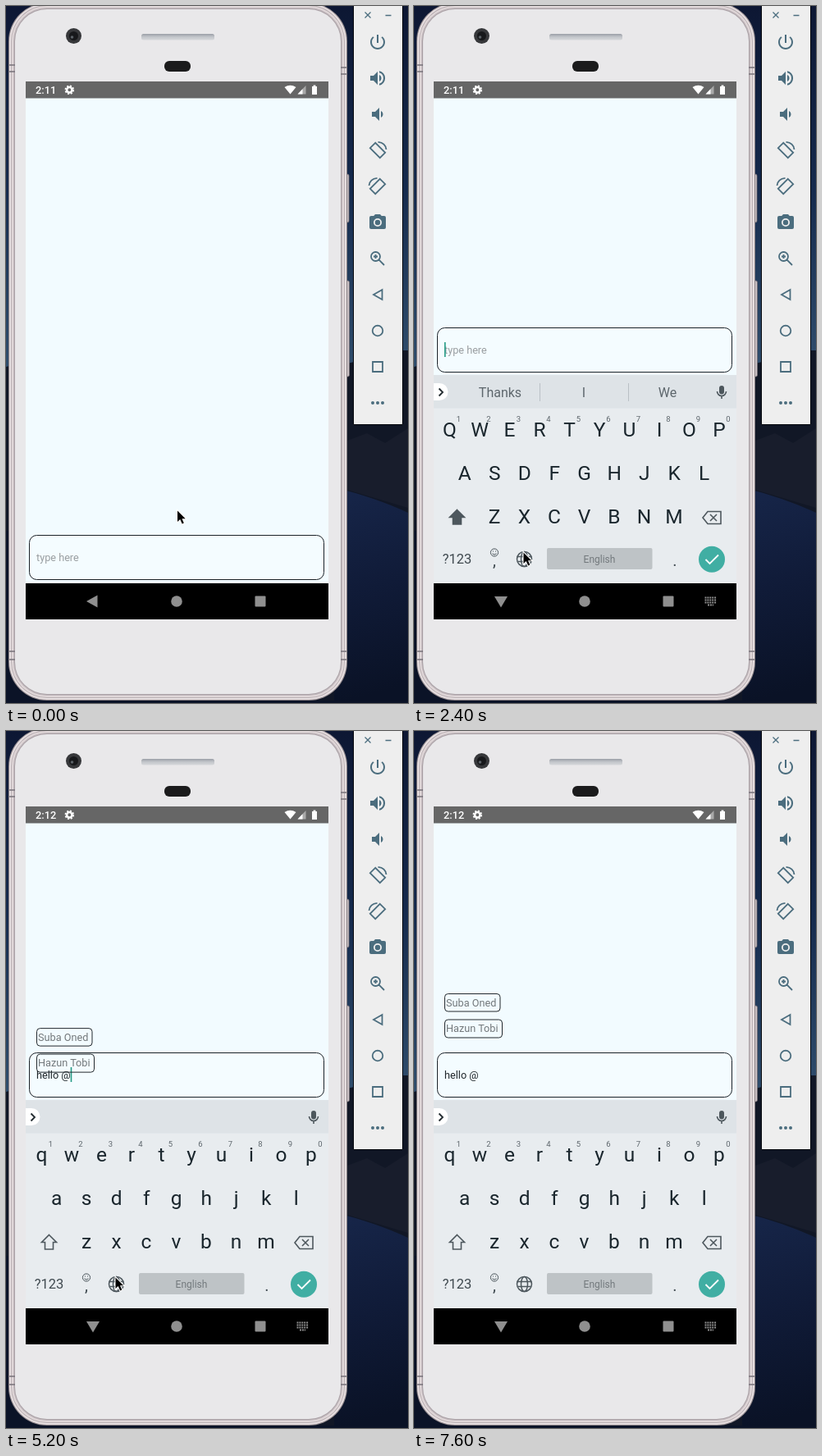
Animation, 490 px wide and 850 px high, one loop 7.7 s. Source, as an HTML page:

```html
<!DOCTYPE html>
<html lang="en">
<head>
<meta charset="utf-8">
<title>Mention input on a phone emulator</title>
<style>
  html, body { margin: 0; width: 100%; height: 100%; overflow: hidden; background: #0c1730; }
  svg { display: block; width: 490px; height: 850px; font-family: Roboto, sans-serif; }
  text { white-space: pre; }
  .mid { text-anchor: middle; }
  .line { fill: none; stroke: #4b6d7e; stroke-width: 1.8; }
</style>
</head>
<body>
<svg viewBox="0 0 490 850">
  <defs>
    <linearGradient id="sky" x2="0" y2="1">
      <stop offset="0" stop-color="#0d1733"/><stop offset=".5" stop-color="#152a4d"/><stop offset="1" stop-color="#304e6d"/>
    </linearGradient>
    <linearGradient id="dune" x2=".1" y2="1">
      <stop offset="0" stop-color="#17264a"/><stop offset=".5" stop-color="#101b38"/><stop offset="1" stop-color="#0a1226"/>
    </linearGradient>
    <linearGradient id="slot" x2="0" y2="1">
      <stop offset="0" stop-color="#9a9ea6"/><stop offset=".5" stop-color="#c3c6cb"/><stop offset="1" stop-color="#d5d7da"/>
    </linearGradient>
    <clipPath id="screen"><path d="M24 92H393V748H24Z"/></clipPath>
  </defs>

  <!-- desktop -->
  <path fill="url(#sky)" d="M0 0H490V445H0Z"/>
  <path fill="#111726" d="M0 440L12 437L416 436L482 420H490V850H0Z"/>
  <path fill="#181d2c" d="M416 530L440 521L462 533L490 515V612L416 590Z"/>
  <path fill="url(#dune)" d="M400 587Q452 600 490 618V850H400Z"/>
  <path fill="#0b1327" d="M0 640H60V850H0ZM0 847H490V850H0Z"/>

  <!-- phone -->
  <g fill="#c9bfc3" stroke="#746d73" stroke-width=".8">
    <rect x="412" y="205" width="6" height="59" rx="2"/>
    <rect x="412" y="335" width="6.5" height="117" rx="2"/>
  </g>
  <g id="body"></g>
  <path stroke="#77717a" stroke-width="1.4" d="M4 72h7M4 80h7M408 75h7M408 83h7M4 787h7M4 797h7M408 787h7M408 797h7"/>
  <circle cx="82.500" cy="36.500" r="9.500" fill="#37383b"/>
  <circle cx="82.500" cy="36.500" r="5.500" fill="#17181b"/>
  <circle cx="80.500" cy="38" r="1.800" fill="#5c6268"/>
  <rect x="165" y="34" width="89" height="7.500" rx="2.500" fill="url(#slot)"/>
  <rect x="193" y="67" width="32" height="13" rx="6" fill="#1b1b1c"/>

  <!-- app -->
  <path fill="#f2fbff" d="M24 92H393V748H24Z"/>
  <path fill="#666" d="M24 92H393V112.500H24Z"/>
  <text id="clock" x="36" y="107" font-size="12.800" font-weight="500" fill="#fff"></text>
  <g fill="none" stroke="#fff">
    <circle cx="77.300" cy="102.300" r="3.200" stroke-width="2.500"/>
    <circle cx="77.300" cy="102.300" r="4.900" stroke-width="1.800" stroke-dasharray="2.100 1.748"/>
  </g>
  <path fill="#fff" d="M339.500 99Q346.500 94.500 353.500 99L346.500 107.500ZM373 98h1.600v-1.600h2.800V98H379V108h-6Z"/>
  <path fill="#a9a9a9" d="M355.500 107.500L365.500 97V107.500Z"/>
  <path fill="#fff" d="M355.500 107.500L361.500 101.200V107.500Z"/>

  <g id="field">
    <rect x="28.500" y="645.500" width="359" height="54" rx="9" fill="#f4fcff" stroke="#1c2127"/>
    <text id="hint" x="37" y="677" font-size="12.700" fill="#999ea1">type here</text>
    <text id="entry" x="37" y="677" font-size="12.700" fill="#20262a"></text>
    <path id="underline" stroke="#20262a"/>
    <rect id="caret" y="663" width="1.600" height="18" fill="#249b85"/>
  </g>
  <g id="chips" font-size="12.700" fill="#73787b">
    <rect x="37.500" y="320.500" width="67.500" height="21.500" rx="4" fill="none" stroke="#23282d"/>
    <text x="39" y="335.500">Suba Oned</text>
    <rect x="37.500" y="352" width="70" height="22" rx="4" fill="none" stroke="#23282d"/>
    <text x="39" y="367">Hazun Tobi</text>
  </g>

  <!-- keyboard -->
  <path fill="#000" d="M24 704H393V748H24Z"/>
  <g clip-path="url(#screen)"><g id="keyboard">
    <path fill="#e8ecef" d="M24 450H393V704H24Z"/>
    <path fill="#dee3e7" d="M24 450H393V490.500H24Z"/>
    <path fill="#000" d="M24 704H393V1000H24Z"/>
    <path fill="#fff" d="M24 460H31a10.500 10.500 0 0 1 0 21H24Z"/>
    <path fill="none" stroke="#222b30" stroke-width="1.800" d="M30.500 466.500L35 471L30.500 475.500"/>
    <g id="words" class="mid" font-size="16" fill="#5d666c">
      <path stroke="#bac0c5" d="M153.500 460V482M261.500 460V482"/>
      <text x="105" y="477"></text><text x="207" y="477"></text><text x="309" y="477"></text>
    </g>
    <rect x="372" y="463" width="6" height="10.500" rx="3" fill="#4d575d"/>
    <path fill="none" stroke="#4d575d" stroke-width="1.600" d="M369.500 470a5.500 5.500 0 0 0 11 0M375 475.500V479"/>
    <g id="keys" class="mid" font-size="24.500" fill="#1a262d"></g>
    <path id="shift" stroke="#4d575d" stroke-width="1.600" d="M52.500 614.500L61.500 623.500H57.500V632H47.500V623.500H43.500Z"/>
    <path fill="none" stroke="#4d575d" stroke-width="1.600" d="M358 616.500H374V631.500H358L352 624ZM361 620L369 628M369 620L361 628"/>
    <g class="mid" fill="#3f494f">
      <text x="52.500" y="680" font-size="16.500">?123</text>
      <text x="98" y="683" font-size="20">,</text>
      <text x="318" y="683" font-size="20">.</text>
    </g>
    <g fill="none" stroke="#4d575d">
      <circle cx="98" cy="666.500" r="4.600"/>
      <path d="M95.500 667.800q2.500 2.600 5 0M96 665h1M99 665h1"/>
      <g stroke-width="1.500">
        <circle cx="134.500" cy="674.500" r="9"/><ellipse cx="134.500" cy="674.500" rx="4" ry="9"/>
        <path d="M126.500 671.500h16M126.500 677.500h16"/>
      </g>
    </g>
    <rect x="162" y="661" width="128.500" height="26" rx="2" fill="#bec3c6"/>
    <text class="mid" x="226" y="679" font-size="12" fill="#73797d">English</text>
    <circle cx="363" cy="674.700" r="16" fill="#40aea3"/>
    <path fill="none" stroke="#fff" stroke-width="1.800" d="M355.500 675L360.500 680L371 669.500"/>
  </g></g>

  <!-- navigation bar -->
  <g fill="#8f8f8f">
    <path id="back"/>
    <circle cx="208" cy="726" r="6.800"/>
    <rect x="303.500" y="719.500" width="13" height="13" rx="1"/>
    <path id="imeIcon" fill="none" stroke="#8f8f8f" stroke-width="2" stroke-dasharray="2 .9"
      d="M354.500 721.500h14M354.500 724.500h14M354.500 727.500h14M358 730.500h7"/>
  </g>

  <!-- emulator toolbar -->
  <path fill="#eee" stroke="#05070c" d="M423.500 -1H483.500V510.500H423.500Z"/>
  <path class="line" style="stroke-width:1.300" d="M437.500 7.500l7 7M444.500 7.500l-7 7M462.500 11.500h7"/>
  <g id="tools" fill="#4b6d7e"></g>

  <path id="mouse" stroke="#fff" stroke-width="2" paint-order="stroke"
    d="M0 .5V14L3.200 11L5.700 16.500L7.800 15.600L5.500 10.300H9.700Z"/>
</svg>

<script>
const LOOP = 7700, STEP = 100;
const FOCUS = 1400, MENTION = 5100, MINUTE = 4500, MOUSE_HIDDEN = 6200;
const $ = id => document.getElementById(id);

function add(parent, tag, attrs, text = '') {
  const el = document.createElementNS('http://www.w3.org/2000/svg', tag);
  for (const name in attrs) el.setAttribute(name, attrs[name]);
  el.textContent = text;
  return parent.appendChild(el);
}

// Metal rim as nested outlines
['#8f878b', '#e0d7d9', '#ebe4e5', '#b9afb3', '#e3dadb', '#ddd4d6', '#c3babe', '#aba2a7', '#e9e8ea']
  .forEach((fill, i) => add($('body'), 'rect',
    { x: 3 + i, y: i - 4, width: 413 - 2 * i, height: 851 - 2 * i, rx: 47 - i, fill }));

const letters = [];
[['qwertyuiop', 43.5, 525], ['asdfghjkl', 61.7, 578], ['zxcvbnm', 98, 630.5]].forEach(([row, left, y], r) =>
  [...row].forEach((char, i) => {
    const x = left + i * 36.5;
    letters.push([add($('keys'), 'text', { x, y }), char]);
    if (!r) add($('keys'), 'text', { x: x + 11, y: 507, 'font-size': 9.5, fill: '#5d666c' }, (i + 1) % 10);
  }));

// Icons on a 24-unit grid; a leading "~" means outlined
[
  'M13 3h-2v10h2V3zm4.830 2.170l-1.420 1.420C17.990 7.860 19 9.810 19 12c0 3.870-3.130 7-7 7s-7-3.130-7-7c0-2.190 1.010-4.140 2.580-5.420L6.170 5.170C4.230 6.820 3 9.260 3 12c0 4.970 4.030 9 9 9s9-4.030 9-9c0-2.740-1.230-5.180-3.170-6.830z',
  'M3 9v6h4l5 5V4L7 9zM16.500 12c0-1.770-1-3.290-2.500-4v8c1.500-.7 2.500-2.250 2.500-4zM14 3.200v2.100a7 7 0 0 1 0 13.400v2.100a9 9 0 0 0 0-17.600z',
  'M18.500 12c0-1.770-1-3.290-2.500-4v8c1.500-.7 2.500-2.250 2.500-4zM5 9v6h4l5 5V4L9 9z',
  '~M9.200 2.800L2.800 9.200L14.800 21.200L21.200 14.800ZM12.500 1.800Q21.500 2.500 22.500 11',
  '~M14.800 2.800L21.200 9.200L9.200 21.200L2.800 14.800ZM11.500 1.800Q2.500 2.500 1.500 11',
  'M9 2L7.200 4H4q-2 0-2 2v12q0 2 2 2h16q2 0 2-2V6q0-2-2-2h-3.200L15 2zM12 7a5 5 0 0 1 0 10a5 5 0 0 1 0-10zM12 8.800a3.200 3.200 0 0 0 0 6.400a3.200 3.200 0 0 0 0-6.400z',
  '~M9.500 4a5.500 5.500 0 0 1 0 11a5.500 5.500 0 0 1 0-11M13.700 13.700L20 20M9.500 7v5M7 9.500h5',
  '~M17.500 6V18L7 12Z',
  '~M12 5.700a6.300 6.300 0 0 1 0 12.600a6.300 6.300 0 0 1 0-12.600',
  '~M6 6h12v12h-12Z',
  'M6 10a2 2 0 0 1 0 4a2 2 0 0 1 0-4M12 10a2 2 0 0 1 0 4a2 2 0 0 1 0-4M18 10a2 2 0 0 1 0 4a2 2 0 0 1 0-4',
].forEach((d, i) => add($('tools'), 'path', {
  d: d.replace('~', ''), class: d[0] === '~' ? 'line' : '', 'fill-rule': 'evenodd',
  transform: `translate(441 ${32 + 44 * i})`,
}));

// [time, text, suggestions]
const typing = [
  [FOCUS, '', 'Thanks I We'],
  [3000, 'h', 'h he hi'],
  [3200, 'he', 'he hey hello'],
  [3400, 'hel', 'hel hello help'],
  [3500, 'hell', 'hell hello hell'],
  [3700, 'hello', 'hello hello hellos'],
  [4000, 'hello ', 'I and there'],
  [MENTION, 'hello @', ''],
];
const mousePath = [[0, 209, 615], [800, 147, 668], [1000, 135, 667], [1900, 135, 667], [2000, 133.5, 666]];

const clamp = v => Math.min(1, Math.max(0, v));
const smooth = v => v * v * (3 - 2 * v);
const show = (id, on) => $(id).style.display = on ? '' : 'none';
const move = (id, x, y) => $(id).setAttribute('transform', `translate(${x} ${y})`);

function mouseAt(t) {
  let [, x, y] = mousePath[0];
  for (let i = 1; i < mousePath.length; i++) {
    const [t0, x0, y0] = mousePath[i - 1], [t1, x1, y1] = mousePath[i];
    if (t < t0) break;
    const k = smooth(clamp((t - t0) / (t1 - t0)));
    x = x0 + (x1 - x0) * k;
    y = y0 + (y1 - y0) * k;
  }
  return [x, y];
}

function draw(t) {
  const open = t > FOCUS, focused = t >= FOCUS;
  const [since, text, suggestions] = typing.filter(k => k[0] <= t).pop() || typing[0];
  const upper = t < typing[1][0];

  $('clock').textContent = t < MINUTE ? '2:11' : '2:12';
  move('field', 0, t >= 1600 ? -253 : 0);
  show('hint', !text);
  $('entry').textContent = text;
  const end = 37 + (text ? $('entry').getComputedTextLength() : 0);
  $('underline').setAttribute('d', /^\w+$/.test(text) ? `M37 679.500H${end}` : '');
  $('caret').setAttribute('x', end);
  show('caret', focused && Math.floor((t - since) / 500) % 2 === 0);

  show('chips', t >= MENTION + STEP);
  move('chips', 0, 47 * (1 - smooth(clamp((t - MENTION) / 500))));

  show('keyboard', open);
  move('keyboard', 0, 254 * (1 - clamp((t - FOCUS) / 240)) ** 3);
  show('words', suggestions);
  const words = suggestions.split(' ');
  document.querySelectorAll('#words text').forEach((el, i) => el.textContent = words[i] || '');
  letters.forEach(([el, char]) => el.textContent = upper ? char.toUpperCase() : char);
  $('shift').setAttribute('fill', upper ? '#4d575d' : 'none');

  $('back').setAttribute('d', open ? 'M98 720H114L106 733.500Z' : 'M111.500 718.500V733.500L98 726Z');
  show('imeIcon', open);
  show('mouse', t < MOUSE_HIDDEN);
  move('mouse', ...mouseAt(t));
}

function tick() {
  draw(Math.floor(performance.now() % LOOP / STEP) * STEP);
  requestAnimationFrame(tick);
}
tick();
</script>
</body>
</html>
```
